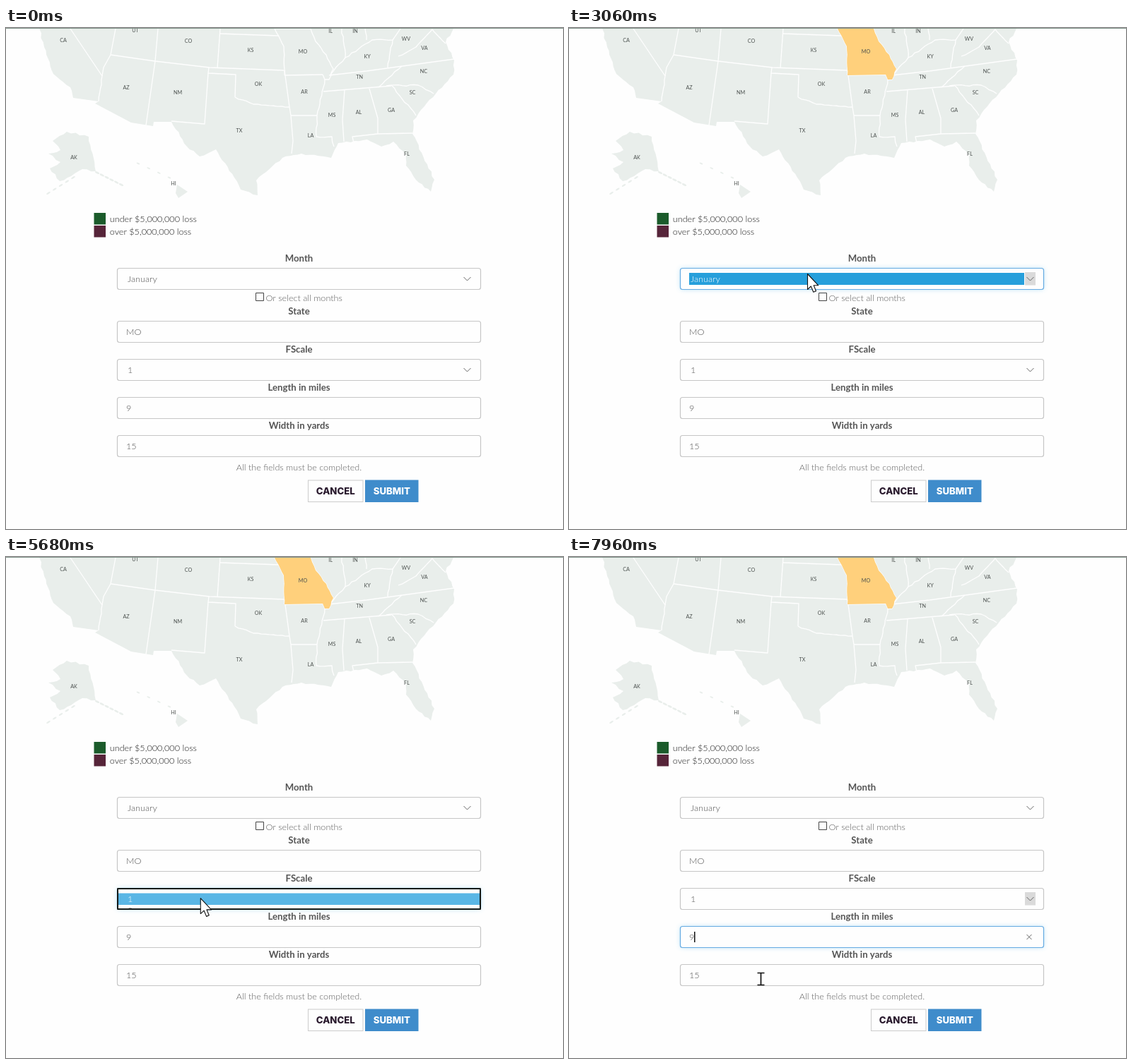
Write an HTML page with a canvas that moves like this. It is 788x710 px and loops after 8000 ms.

```html
<!DOCTYPE html>
<html lang="en">
<head>
<meta charset="utf-8">
<title>Storm loss form</title>
<style>
  html, body { margin: 0; width: 100%; height: 100%; overflow: hidden; background: #fefefe; }
  canvas { display: block; }
</style>
</head>
<body>
<canvas id="stage" width="788" height="710"></canvas>
<script>
const ctx = document.getElementById('stage').getContext('2d');
const LOOP = 8000;
const PAPER = '#fefefe', BLUE = '#269fdb', INK = '#505050';
const LIGHT = '300 12.6px Lato, sans-serif';
const BOLD = '700 13.2px Lato, sans-serif';
const MONTHS = Array.from({ length: 12 }, (_, m) =>
  new Date(2020, m, 1).toLocaleString('en-US', { month: 'long' }));
const SCALES = ['1', '2', '3', '4', '5', '6'];

// Form rows: the first is set apart by the checkbox, the rest are evenly spaced
const MONTH_Y = 340;
const rowY = i => 415 + 54 * i;
const LENGTH_Y = rowY(2), SCALE_Y = rowY(1);

const clamp = v => Math.max(0, Math.min(1, v));
const ease = v => v * v * (3 - 2 * v);
const ramp = (t, a, b) => ease(clamp((t - a) / (b - a)));
const during = (t, a, b) => t >= a && t < b;

let seed = 7;
function random() {
  seed = (seed * 16807) % 2147483647;
  return seed / 2147483647;
}

// Joins key points; a rough line is split into short, seeded side steps
function trace(spec, rough = 0) {
  const keys = spec.split(' ').map(p => p.split(',').map(Number));
  const out = [keys[0]];
  for (let i = 1; i < keys.length; i++) {
    const [x0, y0] = keys[i - 1], [x1, y1] = keys[i];
    const dx = x1 - x0, dy = y1 - y0, len = Math.hypot(dx, dy);
    const n = rough ? Math.max(1, Math.round(len / 6)) : 1;
    for (let k = 1; k <= n; k++) {
      const side = k < n ? (random() * 2 - 1) * rough / len : 0;
      out.push([x0 + dx * k / n - dy * side, y0 + dy * k / n + dx * side]);
    }
  }
  return out;
}

function toPath(points) {
  const path = new Path2D();
  for (const [x, y] of points) path.lineTo(x, y);
  return path;
}

const mainland = toPath([
  ...trace('47,1 54,27 67,65 91,84 95,99', 1.3),
  ...trace('131,104 126,107 177,134 208,139 209,133 234,133'),
  ...trace('234,133 256,168 274,182 297,172 323,212 332,229 356,237 354,216 391,184', 1.3),
  ...trace('391,184 418,178 460,184 470,163 511,158 531,168 548,161 566,180 566,195', 1.3),
  ...trace('566,195 584,219 601,232 606,215 575,150 576,131 608,93 633,66 634,46 622,20 633,1', 1.3)
]);
const alaska = toPath(trace('86,147 117,154 127,203 108,200 92,210 76,217 62,199 77,190 60,178 77,173 66,160 86,147', 1.3));
const hawaii = toPath(trace('242,222 257,232 244,241 240,234'));
const missouri = toPath([
  ...trace('394,67 393,26 380,1', .6),
  ...trace('431,1 438,19 453,38 463,58 457,73 451,73 448,66', .8)
]);

const borders = [
  '91,1 136,68', '155,1 148,38 138,56 136,68', '148,38 211,47 288,56 393,60',
  '215,1 211,47 198,138', '303,1 299,57', '303,8 386,11',
  '287,56 286,64 325,66 324,98', '286,64 281,136 234,132',
  '394,60 401,112 403,124 406,160 404,178', '403,124 440,124', '394,67 448,66',
  '449,90 545,82', '479,88 476,130 478,161', '514,86 526,128 526,150 575,149',
  '526,150 490,154 492,163', '457,67 510,61 634,44'
].map(s => toPath(trace(s)));
const rivers = [
  '136,68 131,104', '324,98 350,108 401,112', '451,73 440,124 439,154 461,154 464,168',
  '545,81 580,124', '538,82 583,81 605,93', '560,54 527,84',
  '459,66 480,42 518,17 547,17 558,1', '475,1 480,42', '508,1 510,17',
  '547,17 540,56', '555,40 580,27 603,2 622,22'
].map(s => toPath(trace(s, 1)));

// Island chains: blobs strung between two ends
const islets = new Path2D();
function chain(n, x0, y0, x1, y1, size) {
  const tilt = Math.atan2(y1 - y0, x1 - x0);
  for (let i = 0; i < n; i++) {
    const k = i / (n - 1);
    const x = x0 + (x1 - x0) * k, y = y0 + (y1 - y0) * k;
    islets.moveTo(x, y);
    islets.ellipse(x, y, size, size * .4, tilt, 0, 7);
  }
}
chain(5, 95, 212, 60, 234, 3.2);
chain(6, 129, 205, 163, 222, 3.4);
chain(4, 187, 192, 231, 212, 2.6);

const labels = 'CA 81 17,UT 183 3,CO 258 18,KS 346 31,IL 459 4,IN 494 4,WV 566 15,VA 592 28,KY 511 40,NC 591 61,TN 500 69,SC 575 91,GA 545 116,AL 499 119,MS 461 123,AR 422 90,OK 357 79,AZ 170 84,NM 243 91,TX 330 145,LA 431 152,FL 567 178,AK 96 183,HI 237 220,MO 420 33'
  .split(',').map(s => s.split(' '));

// Pointer moves: start, end, x, y
const START = [352, 192];
const moves = [
  [500, 1120, 381, 20], [1120, 1270, 371, 77], [1350, 1580, 400, 44],
  [2280, 2810, 337, 348], [3060, 3820, 331, 356], [3980, 4670, 290, 424],
  [4820, 5130, 275, 482], [5610, 5940, 273, 491], [6560, 6900, 275, 537],
  [7500, 7960, 271.5, 598]
];
const arrow = new Path2D('M.5.5V22.5L5.3 18 8.8 26.3 12.5 24.7 9.2 16.8H15.8Z');
const hand = new Path2D('M4.5 13V2.5Q6.2-.5 8 2.5V8.5Q9.8 7 11 9 13 8 13.7 10 15.5 9.5 16 11.5V17L14 23.5H5.5L4.5 20.5.8 15Q0 12 2.5 12.5Z');
const knuckles = new Path2D('M8 8V13M11 9V13M13.7 10V14');
const beam = new Path2D('M-5-8.5H5M0-8.5V8.5M-5 8.5H5');

function text(str, x, y, font, color, align = 'left') {
  ctx.font = font;
  ctx.fillStyle = color;
  ctx.textAlign = align;
  ctx.fillText(str, x, y);
}

function rect(x, y, w, h, color) {
  ctx.fillStyle = color;
  ctx.fillRect(x, y, w, h);
}

function fill(path, color) {
  ctx.fillStyle = color;
  ctx.fill(path);
}

function line(path, color, width) {
  ctx.strokeStyle = color;
  ctx.lineWidth = width;
  ctx.stroke(path);
}

function drawMap(selected) {
  for (const land of [mainland, alaska, hawaii, islets]) fill(land, '#e9eeeb');
  ctx.lineJoin = 'round';
  for (const path of [...borders, ...rivers, missouri]) line(path, PAPER, 1.3);
  if (selected) fill(missouri, '#ffd07c');
  for (const [name, x, y] of labels) {
    text(name, +x, +y + 2.6, '400 7.2px Lato, sans-serif', '#4b504e', 'center');
  }
  rect(0, 0, 788, 1, '#82958b');
}

function drawLegend() {
  [['under', '#1b5b2b'], ['over', '#562439']].forEach(([word, color], i) => {
    rect(124.5, 262 + 18 * i, 16.5, 16.5, color);
    text(word + ' $5,000,000 loss', 146.8, 274.5 + 18.5 * i, LIGHT, '#1c1c1c');
  });
}

function drawField(y, focused, value, x = 170) {
  ctx.save();
  ctx.beginPath();
  ctx.roundRect(157.5, y + .5, 514, 30, 3);
  if (focused) {
    ctx.shadowColor = 'rgba(102,190,240,.45)';
    ctx.shadowBlur = 6;
  }
  ctx.fillStyle = PAPER;
  ctx.fill();
  ctx.shadowColor = 'transparent';
  ctx.strokeStyle = focused ? '#66abe2' : '#c6c6c6';
  ctx.lineWidth = 1.2;
  ctx.stroke();
  ctx.restore();
  text(value, x, y + 20, LIGHT, INK);
}

function drawSelect(y, value, focused, hover) {
  drawField(y, focused, value, 172);
  if (focused) {
    rect(170, y + 7, 474, 17, BLUE);
    text(value, 172, y + 20, LIGHT, '#fff');
  }
  if (hover) rect(645, y + 6, 15, 18.5, '#dadada');
  line(new Path2D(`M647.5 ${y + 13}l5 5 5-5`), '#666', 1);
}

function drawList(y, items, fullHeight, open, pressed) {
  if (open <= 0) return;
  const h = 31 + (fullHeight - 31) * open;
  ctx.save();
  ctx.beginPath();
  ctx.rect(157, y, 515, h);
  ctx.clip();
  rect(157, y, 515, h, PAPER);
  rect(159, y + 7.5, 512, 16.5, pressed ? BLUE : '#5ab6e5');
  items.forEach((item, i) => text(item, 172, y + 20 + i * 16.4, LIGHT, i ? INK : '#fff'));
  ctx.strokeStyle = '#141a18';
  ctx.lineWidth = 2;
  ctx.strokeRect(158, y + 1, 513, h - 2);
  ctx.restore();
}

function drawButtons() {
  const font = '800 13.2px Inter, sans-serif';
  rect(427, 640.5, 78.5, 31.5, '#cccccc');
  rect(428, 641.5, 76.5, 29.5, PAPER);
  text('CANCEL', 466.3, 661.3, font, '#2a1a2e', 'center');
  rect(508, 640.5, 75.5, 31.5, '#3f8ccb');
  text('SUBMIT', 545.8, 661.3, font, '#fff', 'center');
}

function drawForm(t) {
  const lengthFocus = t >= 6900;

  text('Month', 414.5, MONTH_Y - 9, BOLD, '#555', 'center');
  ['State', 'FScale', 'Length in miles', 'Width in yards'].forEach((name, i) =>
    text(name, 414.5, rowY(i) - 9.5, BOLD, '#555', 'center'));

  ctx.strokeStyle = '#444';
  ctx.lineWidth = 1;
  ctx.strokeRect(353.5, 375.5, 11, 11);
  text('Or select all months', 367.5, 387, LIGHT, '#5c5c5c');

  drawSelect(MONTH_Y, 'January', during(t, 3060, 5610), during(t, 2780, 4350));
  drawField(rowY(0), false, 'MO');
  drawSelect(SCALE_Y, '1', during(t, 5610, 6900), t >= 5050);
  drawField(LENGTH_Y, lengthFocus, '9');
  drawField(rowY(3), false, '15');
  text('All the fields must be completed.', 414.5, 626.5, LIGHT, '#5c5c5c', 'center');
  drawButtons();

  if (lengthFocus) {
    rect(177, LENGTH_Y + 8, 1.5, 15, '#111');
    line(new Path2D('M647.5 535l7 7m0-7l-7 7'), '#666', 1);
  }
  if (during(t, 7050, 7450)) {
    rect(157, 556, 515, 114, '#f1f1f1');
    ['9', '9.5'].forEach((hint, i) =>
      text(hint, 171.5, 591 + 58 * i, '400 20px "Open Sans", sans-serif', '#111'));
  }
  drawList(MONTH_Y, MONTHS, 211, ramp(t, 3130, 3500) - ramp(t, 4060, 4210), t >= 3980);
  drawList(SCALE_Y, SCALES, 109, ramp(t, 5680, 5940) - ramp(t, 6560, 6700), t >= 6320);
}

function pointerAt(t) {
  let [x, y] = START;
  for (const [from, to, nx, ny] of moves) {
    const k = ramp(t, from, to);
    x += (nx - x) * k;
    y += (ny - y) * k;
  }
  return [x, y];
}

function drawPointer(t) {
  if (t < moves[0][0]) return;
  const [x, y] = pointerAt(t);
  const overText = [rowY(0), rowY(2), rowY(3)].some(top => during(y, top, top + 31));
  ctx.save();
  ctx.translate(x, y);
  if (overText) {
    line(beam, '#111', 1.7);
  } else {
    const shape = y < 235 ? hand : arrow;
    fill(shape, '#fff');
    line(shape, '#111', 1.1);
    if (shape === hand) line(knuckles, '#111', 1);
  }
  ctx.restore();
}

function frame() {
  const t = performance.now() % LOOP;
  rect(0, 0, 788, 710, PAPER);
  drawMap(t >= 1900);
  drawLegend();
  drawForm(t);
  drawPointer(t);
  requestAnimationFrame(frame);
}
frame();
</script>
</body>
</html>
```
